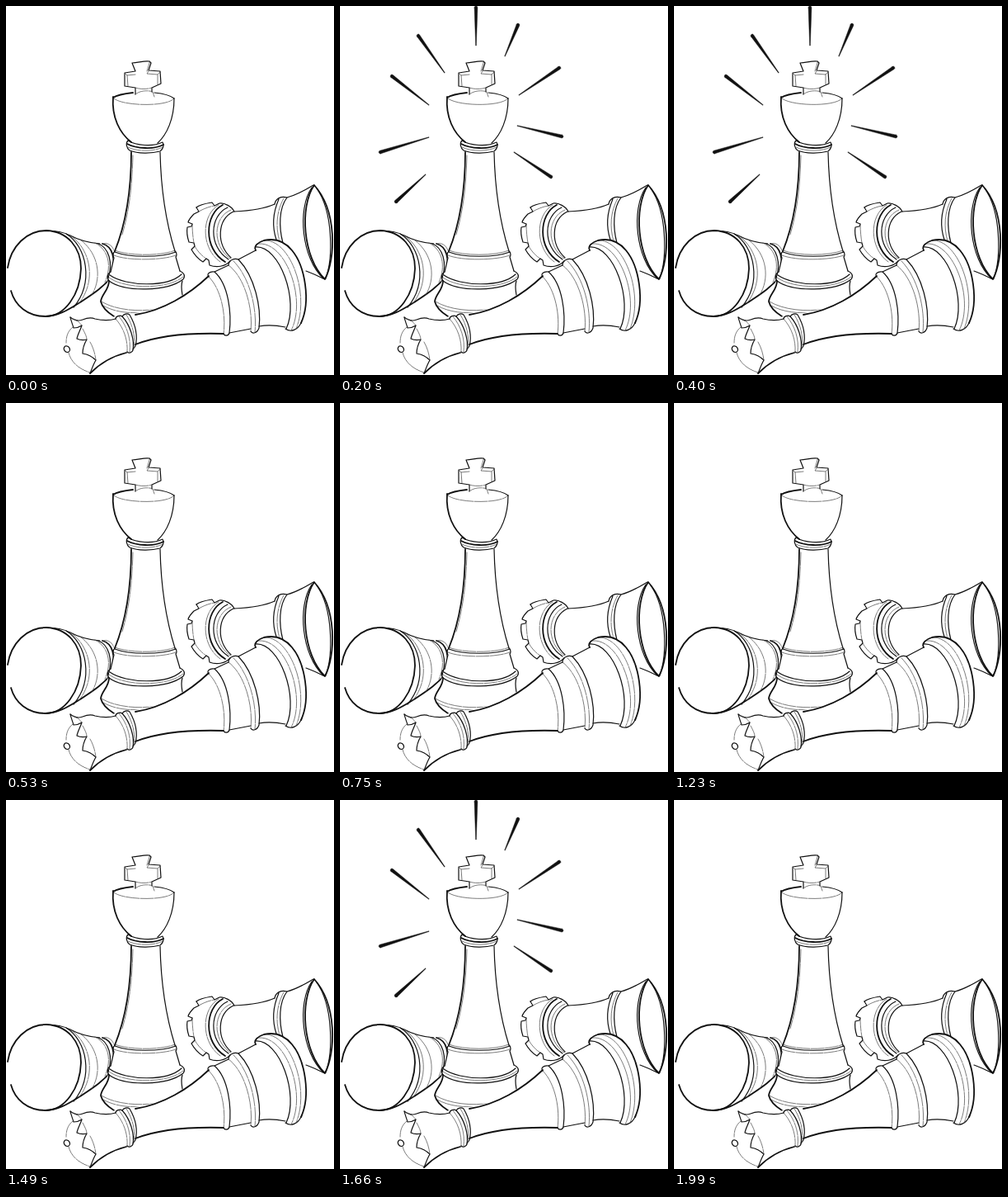
These frames come from a looping animation (398x447 px, 2190 ms). An HTML page:

```html
<!DOCTYPE html>
<html lang="en">
<head>
<meta charset="utf-8">
<title>Chess king</title>
<style>
html, body { margin: 0; width: 100%; height: 100%; overflow: hidden; background: #fff; }
svg { display: block; width: 398px; height: 447px; }
path { fill: none; stroke: #111; stroke-width: 1.2; stroke-linecap: round; stroke-linejoin: round; }
.bold { stroke-width: 1.8; }
.fine { stroke-width: .7; stroke: #444; animation: sketch 2190ms step-end infinite; }
.mask { fill: #fff; stroke: none; }
#rays { animation: flash 2190ms step-end infinite; }
#rays path { fill: #111; stroke-width: .5; }
@keyframes flash {
  0%, 24.201%, 56.164%, 90.868%, 100% { visibility: hidden; }
  9.132%, 41.096%, 75.799% { visibility: visible; }
}
/* Fine lines break up slightly while the rays are out. */
@keyframes sketch {
  0%, 24.201%, 56.164%, 90.868%, 100% { stroke-dasharray: 16 1.3; }
  9.132%, 41.096%, 75.799% { stroke-dasharray: none; }
}
</style>
</head>
<body>
<svg viewBox="0 0 398 447">
  <g id="rays"></g>

  <g id="rook">
    <path class="bold" d="M374 217C356 243 360 305 387 331C400 306 402 248 374 217"/>
    <path d="M371 220C353 246 359 306 385 330M377 221C397 249 397 305 388 330"/>
    <path d="M277 249C299 248 315 245 326 240M341 232C353 229 363 223 373 217M364 321C373 324 380 328 387 331"/>
    <path d="M326 240C327 233 334 230 341 232C331 245 331 268 336 287M331 234C324 250 323 268 328 283"/>
    <path class="fine" d="M337 233C328 249 327 268 332 285"/>
    <path d="M231 244L234 249L228 252C225 255 222 258 221 262L226 264L225 267L220 268C219 274 220 280 222 286L228 287L229 291L225 295C229 302 234 307 239 310L243 306L246 308L247 314C255 317 266 316 272 309"/>
    <path d="M231 244C236 240 244 239 250 238L253 242L259 239C265 238 274 243 277 249"/>
    <path class="fine" d="M234 249C239 246 246 243 253 242M226 264C226 273 227 281 228 287M229 291C233 298 238 303 243 306"/>
    <path class="bold" d="M263 241C241 252 239 294 266 310"/>
    <path d="M269 244C247 254 245 291 270 307M276 249C256 259 255 288 273 305"/>
    <path class="fine" d="M258 241C236 254 237 294 260 310M273 247C251 256 250 290 272 306"/>
  </g>

  <g id="pawn">
    <path class="bold" d="M2 317C6 291 25 272 49 272C75 273 91 293 91 318C90 350 71 376 48 376C26 376 11 363 6 345"/>
    <path class="bold" d="M48 376C66 375 78 366 90 359C105 349 118 341 129 327"/>
    <path d="M49 272C61 272 70 274 78 278C89 284 102 287 114 288"/>
    <path d="M73 276C98 291 107 335 82 365"/>
    <path class="fine" d="M78 278C102 294 111 332 88 361M90 283C114 301 116 331 104 350M108 287C124 295 129 314 120 335"/>
    <path class="bold" d="M117 288C129 291 134 306 128 326"/>
    <path d="M112 288C125 293 130 311 124 330"/>
    <path class="fine" d="M117 288C123 286 129 290 131 296"/>
  </g>

  <g id="king">
    <path class="mask" d="M152 176C152 221 147 260 132 297L126 326L115 360L130 377L190 372L215 350L211 322L205 297C195 265 188 225 187 176Z"/>
    <path d="M153 69C160 69 167 66 174 67L176 69L173 78L187 79L188 94L177 99L177 104M153 69L157 79L144 81L144 97L157 99L157 107"/>
    <path class="fine" d="M174 67L174 69L171 79M145 82L147 84L148 97M147 84L157 83M173 79L171 82L184 83L187 80M184 83L184 95M157 99C163 101 171 101 177 99M157 107C163 102 173 102 178 104L180 110"/>
    <path class="bold" d="M130 111C136 107 145 106 154 105"/>
    <path d="M180 105C190 106 199 108 204 112"/>
    <path class="fine" d="M130 111C138 121 194 123 204 112"/>
    <path class="bold" d="M130 110C128 135 138 154 152 165"/>
    <path d="M204 112C204 137 195 156 184 166"/>
    <path d="M148 163C158 169 178 171 190 165C192 168 191 173 187 176C176 179 160 179 150 175C146 172 145 166 148 163"/>
    <path class="bold" d="M147 167C158 173 180 174 191 168"/>
    <path class="fine" d="M148 171C160 177 181 176 190 171"/>
    <path class="bold" d="M152 177C152 221 147 260 132 297"/>
    <path d="M187 177C188 225 195 265 205 297"/>
    <path class="fine" d="M154 181C153 217 150 246 141 277"/>
    <path d="M132 298C150 305 188 305 206 298"/>
    <path class="fine" d="M132 296C150 303 188 303 205 296M131 302C148 309 190 308 206 302"/>
    <path d="M132 297C129 300 130 304 131 305L127 322M205 297C208 299 207 303 206 304L211 321"/>
    <path d="M127 322C123 324 122 330 125 333C144 347 196 346 215 331C218 327 216 323 211 321"/>
    <path d="M126 326C146 340 196 341 213 325"/>
    <path class="fine" d="M125 329C144 343 196 344 215 328"/>
    <path class="bold" d="M125 333C125 344 116 349 115 358C117 366 123 371 131 376"/>
    <path d="M214 333C212 339 213 344 214 350"/>
    <path class="fine" d="M116 358C132 368 160 371 184 367M118 363C132 371 152 373 170 371"/>
  </g>

  <g id="queen">
    <path class="mask" d="M78 377L109 381L149 373C190 369 222 350 246 327L303 291C310 281 330 280 345 292C368 315 372 365 357 390L341 393L157 411L102 446L80 436C67 425 70 395 79 388Z"/>
    <path class="bold" d="M157 374C190 369 222 350 246 327"/>
    <path class="bold" d="M157 410C190 397 230 396 264 397"/>
    <path d="M253 322L270 314M282 307L303 296M271 396L297 391M307 388C318 386 329 387 339 389"/>
    <path d="M246 328C243 325 247 321 253 322C270 337 274 372 271 396C270 400 265 400 264 397"/>
    <path d="M270 314C270 308 277 305 282 307C302 328 310 365 307 390C305 396 299 398 297 394"/>
    <path class="fine" d="M246 328C262 344 267 376 264 397M270 314C290 329 300 367 297 394M276 309C296 329 305 367 302 395"/>
    <path class="bold" d="M303 296C300 291 306 286 313 284C326 281 338 285 347 296C363 315 370 358 358 384"/>
    <path d="M358 384C354 392 346 396 339 391"/>
    <path d="M303 292C332 290 356 357 340 391"/>
    <path class="fine" d="M307 288C340 286 365 356 346 393M316 284C346 286 369 350 352 391"/>
    <path d="M133 379C133 376 138 374 141 376C151 387 156 404 154 417C153 420 149 421 147 419"/>
    <path d="M141 376C143 373 147 372 150 374C157 386 160 400 157 412L154 416"/>
    <path class="fine" d="M133 379C143 390 148 405 147 419M137 376C147 388 152 404 150 419M146 374C154 387 157 400 155 413"/>
    <path d="M78 377C83 381 88 382 93 380C98 378 103 377 108 379C117 381 126 381 133 379"/>
    <path class="bold" d="M102 445C116 431 130 424 146 420"/>
    <path d="M78 377C79 382 81 386 82 390C86 390 89 389 92 387C90 393 87 398 86 403C90 405 94 405 98 404C95 409 93 415 93 421C99 422 105 425 109 429C106 434 104 440 102 445"/>
    <path class="fine" d="M82 379C87 381 90 384 92 387M93 391C96 397 98 400 98 404M102 407C106 414 108 421 109 429"/>
    <path class="fine" d="M81 389C75 394 73 400 73 408M76 420C79 432 89 440 102 444"/>
    <path d="M72 412C77 411 79 417 76 419C72 421 68 415 72 412"/>
  </g>
</svg>
<script>
// Each ray: outer x, y, then inner x, y.
const rays = [
  [165, 2, 165, 48], [216, 23, 200, 61], [266, 75, 217, 108],
  [269, 158, 215, 145], [256, 207, 211, 177], [68, 237, 104, 204],
  [49, 177, 108, 159], [63, 85, 108, 120], [95, 36, 127, 81]
];

function taper([x, y, u, v]) {
  const len = Math.hypot(u - x, v - y);
  const nx = (y - v) / len, ny = (u - x) / len;
  const at = (px, py, w) => `${px + nx * w} ${py + ny * w}`;
  return `M${at(x, y, 1.9)}L${at(u, v, .3)}L${at(u, v, -.3)}L${at(x, y, -1.9)}A1.9 1.9 0 0 0 ${at(x, y, 1.9)}Z`;
}

const group = document.getElementById('rays');
for (const ray of rays) {
  const path = document.createElementNS('http://www.w3.org/2000/svg', 'path');
  path.setAttribute('d', taper(ray));
  group.append(path);
}
</script>
</body>
</html>
```
